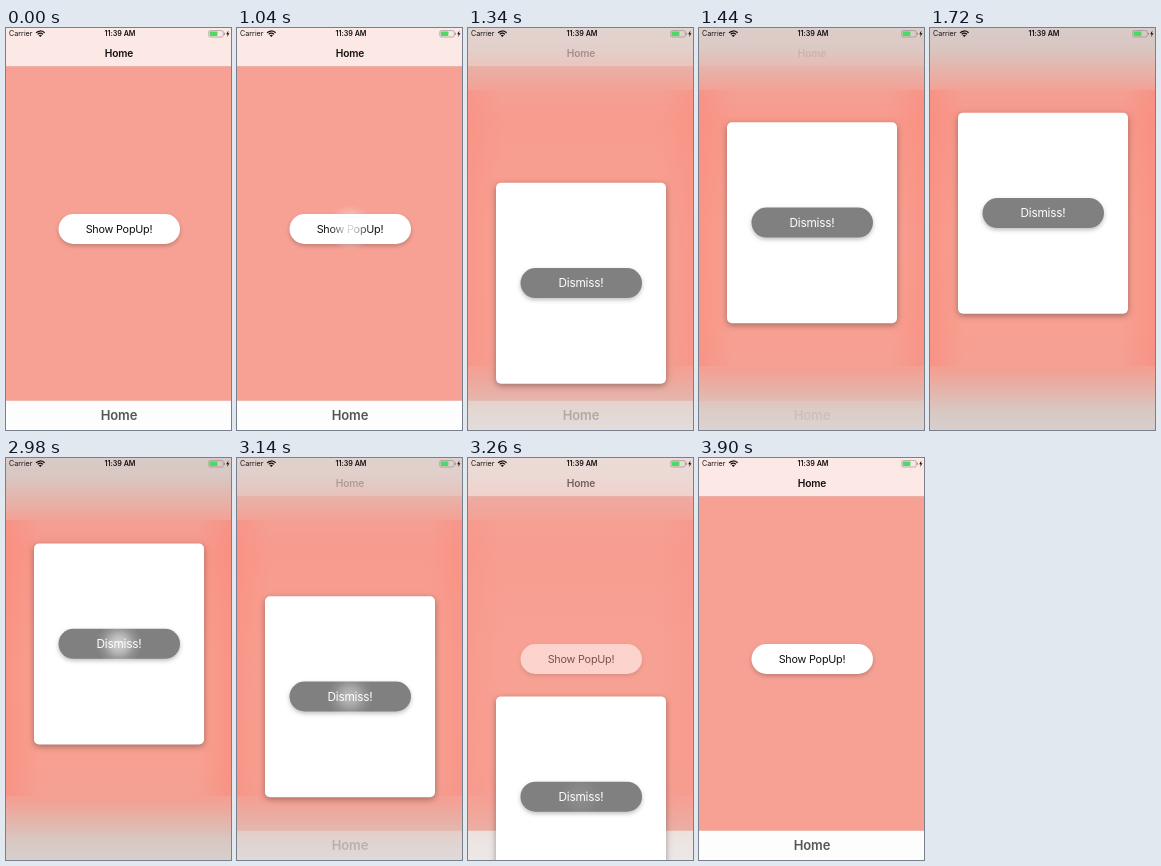
Recreate the animation shown at these times as an HTML page with a canvas. Size 225 px wide and 402 px high, loop 4240 ms.

```html
<!DOCTYPE html>
<html lang="en">
<head>
<meta charset="utf-8">
<title>Popup</title>
<style>
html, body { margin: 0; width: 100%; height: 100%; overflow: hidden; background: #f7a195; }
canvas { display: block; width: 100%; height: 100%; }
</style>
</head>
<body>
<canvas id="stage"></canvas>
<script>
const W = 225, H = 402, LOOP = 4240;
const FONT = 'Inter, "Liberation Sans", sans-serif';
const canvas = document.getElementById('stage');
const ctx = canvas.getContext('2d');

const clamp = v => Math.min(1, Math.max(0, v));
const span = (t, from, to) => clamp((t - from) / (to - from));

function resize() {
  const ratio = window.devicePixelRatio || 1;
  canvas.width = Math.round(innerWidth * ratio);
  canvas.height = Math.round(innerHeight * ratio);
}

function text(str, x, y, size, weight, color, align = 'center', spacing = 0) {
  ctx.font = `${weight} ${size}px ${FONT}`;
  ctx.letterSpacing = spacing + 'px';
  ctx.textAlign = align;
  ctx.textBaseline = 'alphabetic';
  ctx.fillStyle = color;
  ctx.fillText(str, x, y);
}

function box(x, y, w, h, r, color, shadow) {
  ctx.save();
  if (shadow) {
    const scale = canvas.width / W;
    ctx.shadowColor = `rgba(0,0,0,${shadow.alpha})`;
    ctx.shadowBlur = shadow.blur * scale;
    ctx.shadowOffsetY = shadow.dy * scale;
  }
  ctx.fillStyle = color;
  ctx.beginPath();
  ctx.roundRect(x, y, w, h, r);
  ctx.fill();
  ctx.restore();
}

function gradient(x0, y0, x1, y1, stops) {
  const g = ctx.createLinearGradient(x0, y0, x1, y1);
  for (const [at, color] of stops) g.addColorStop(at, color);
  return g;
}

function glow(x, y, alpha) {
  if (alpha <= 0) return;
  const g = ctx.createRadialGradient(x, y, 0, x, y, 23);
  g.addColorStop(0, `rgba(255,255,255,${alpha})`);
  g.addColorStop(0.35, `rgba(255,255,255,${alpha * 0.72})`);
  g.addColorStop(0.7, `rgba(255,255,255,${alpha * 0.22})`);
  g.addColorStop(1, 'rgba(255,255,255,0)');
  ctx.fillStyle = g;
  ctx.fillRect(x - 23, y - 23, 46, 46);
}

function drawHome(touch) {
  ctx.fillStyle = '#f7a195';
  ctx.fillRect(0, 0, W, H);
  ctx.fillStyle = '#fce8e4';
  ctx.fillRect(0, 0, W, 38);
  ctx.fillStyle = '#e0bdb7';
  ctx.fillRect(0, 38, W, 0.5);
  text('Home', 113, 28.5, 10.2, 600, '#111', 'center', -0.1);

  box(52.5, 186, 121.5, 30, 15, '#fff', { alpha: 0.22, blur: 4, dy: 2 });
  text('Show PopUp!', 113, 205, 10.8, 400, '#111', 'center', -0.22);
  glow(113, 200, touch);

  ctx.fillStyle = '#fdfdfd';
  ctx.fillRect(0, 373, W, 29);
  ctx.fillStyle = '#eccfca';
  ctx.fillRect(0, 372.5, W, 0.5);
  text('Home', 113, 392, 13, 600, '#555', 'center', -0.1);
}

function drawBlur(alpha) {
  if (alpha <= 0) return;
  ctx.save();
  ctx.globalAlpha = alpha;
  ctx.fillStyle = gradient(0, 0, 0, H, [
    [0, '#d8cbc8'], [0.05, '#d9c6c1'], [0.1, '#e4b5ac'], [0.16, '#f49f93'],
    [0.23, '#f8998b'], [0.5, '#f8a192'], [0.76, '#f8a091'], [0.85, '#f3a093'],
    [0.91, '#e2b7ae'], [0.95, '#d9c7c2'], [1, '#d7cfcc']
  ]);
  ctx.fillRect(0, 0, W, H);

  // redder rims at both sides
  const rim = 'rgba(249,138,124,0.6)', clear = 'rgba(249,138,124,0)';
  ctx.fillStyle = gradient(0, 0, W, 0, [[0, rim], [0.15, clear], [0.85, clear], [1, rim]]);
  ctx.fillRect(0, 62, W, 276);
  ctx.restore();
}

function drawCard(y, touch) {
  if (y > H + 8) return;
  box(28, y, 170, 201, 5, '#fff', { alpha: 0.34, blur: 6, dy: 2 });
  box(52.5, y + 85.3, 121.5, 30, 15, '#808080', { alpha: 0.25, blur: 4, dy: 2 });
  text('Dismiss!', 113, y + 104.6, 11.8, 400, '#fff', 'center', -0.2);
  glow(113, y + 100.3, touch);
}

function drawStatus() {
  text('Carrier', 3, 8.3, 7.2, 400, '#111', 'left');
  text('11:39 AM', 114, 8.3, 7.2, 600, '#111', 'center', -0.05);

  // wifi
  ctx.strokeStyle = ctx.fillStyle = '#111';
  ctx.lineWidth = 1.25;
  for (const r of [3.6, 5.8]) {
    ctx.beginPath();
    ctx.arc(34.3, 8.8, r, -Math.PI * 0.76, -Math.PI * 0.24);
    ctx.stroke();
  }
  ctx.beginPath();
  ctx.moveTo(34.3, 8.9);
  ctx.arc(34.3, 8.9, 2.1, -Math.PI * 0.76, -Math.PI * 0.24);
  ctx.fill();

  // battery
  ctx.strokeStyle = '#8d8583';
  ctx.lineWidth = 0.6;
  ctx.beginPath();
  ctx.roundRect(202.8, 2.6, 14.4, 6.4, 1.5);
  ctx.stroke();
  box(203.8, 3.6, 7.6, 4.4, 0.7, '#4cd964');
  box(217.9, 4.6, 0.9, 2.4, 0.4, '#8d8583');
  ctx.fillStyle = '#111';
  ctx.beginPath();
  [[222.4, 2.6], [220.2, 6.2], [221.7, 6.2], [221.1, 9], [223.5, 5.2], [222, 5.2]]
    .forEach(([x, y]) => ctx.lineTo(x, y));
  ctx.fill();
}

// underdamped rise with a slight overshoot, then an accelerating drop
function cardY(t) {
  const rest = 85.5, travel = 320;
  if (t < 1170) return H + 20;
  if (t < 3000) {
    const s = (t - 1170) / 1000, w = 7.95, a = 12;
    return rest + travel * Math.exp(-a * s) * (Math.cos(w * s) + a / w * Math.sin(w * s));
  }
  if (t >= 3400) return H + 20;
  return rest + travel * Math.pow(span(t, 3000, 3400), 1.73);
}

function blurAlpha(t) {
  if (t < 3000) return 1 - Math.pow(1 - span(t, 1150, 1560), 2);
  return 1 - Math.pow(span(t, 3000, 3400), 1.45);
}

function touchAlpha(t, start, hold, end, peak) {
  return t < start ? 0 : peak * (1 - span(t, hold, end));
}

function draw(t) {
  ctx.setTransform(canvas.width / W, 0, 0, canvas.height / H, 0, 0);
  drawHome(touchAlpha(t, 1040, 1140, 1360, 0.9));
  drawBlur(blurAlpha(t));
  drawCard(cardY(t), touchAlpha(t, 2940, 3080, 3300, 0.65));
  drawStatus();
}

const start = performance.now();
function tick() {
  draw((performance.now() - start) % LOOP);
  requestAnimationFrame(tick);
}

addEventListener('resize', resize);
resize();
tick();
</script>
</body>
</html>
```
